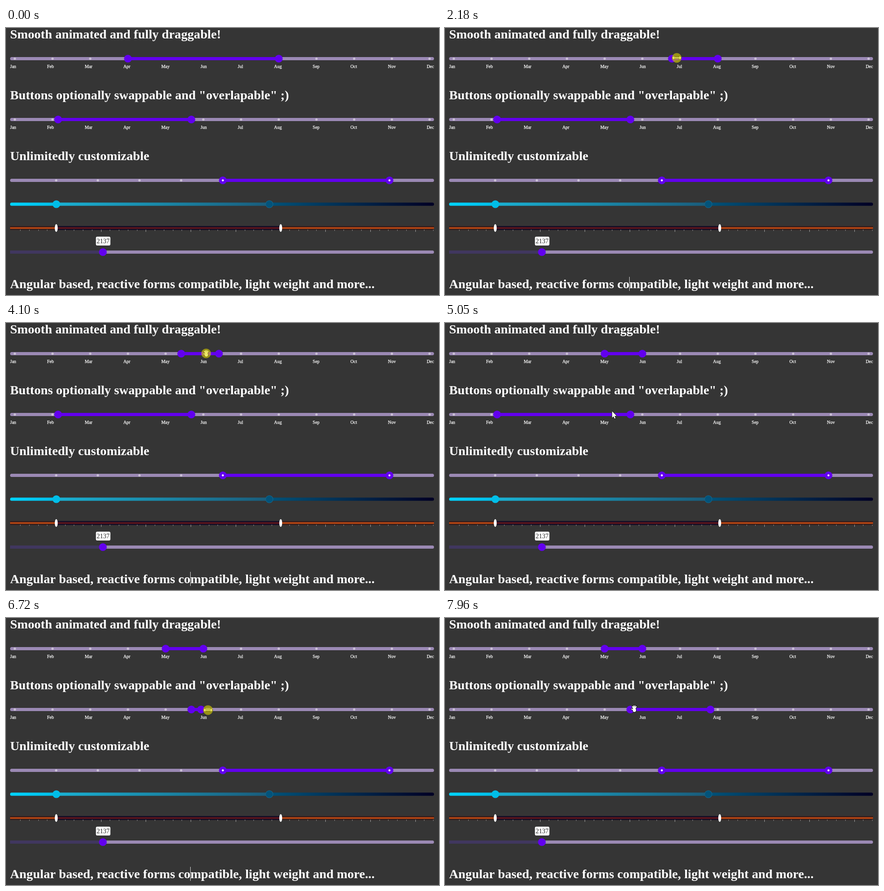
An HTML page with a canvas that plays this animation: 952 px wide and 588 px high, repeating every 8000 ms.

```html
<!DOCTYPE html>
<html lang="en">
<head>
<meta charset="utf-8">
<title>Range sliders</title>
<style>
  html, body { margin: 0; width: 100%; height: 100%; overflow: hidden; background: #353535; }
  canvas { display: block; }
</style>
</head>
<body>
<canvas id="stage" width="952" height="588"></canvas>
<script>
const ctx = document.getElementById('stage').getContext('2d');
const LOOP = 8000, LEFT = 9, RIGHT = 941, LAG = 40;
const SERIF = '"Liberation Serif", "Times New Roman", serif';
const BG = '#353535', TRACK = '#9b89b4', ACTIVE = '#6200ee', DOT = '#cbc1d6';
const MONTHS = 'Jan Feb Mar Apr May Jun Jul Aug Sep Oct Nov Dec'.split(' ');
const monthX = i => 19.4 + i * 82.9;

const linear = u => u;
const smooth = u => u * u * (3 - 2 * u);
const easeOut = u => 1 - (1 - u) ** 3;
const mix = (a, b, u) => a + (b - a) * u;
const clamp = u => Math.max(0, Math.min(1, u));

// Stops of the pointer; the last field eases the way there
const STOPS = [
  { t: 320, x: 72, y: 580 },
  { t: 1090, x: 259, y: 55 },
  { t: 1160, x: 267, y: 64 },
  { t: 1525, x: 267, y: 64 },
  { t: 2300, x: 526, y: 66 },
  { t: 3000, x: 577, y: 67 },
  { t: 3400, x: 577, y: 67 },
  { t: 4200, x: 434, y: 67 },
  { t: 4550, x: 473, y: 137 },
  { t: 5050, x: 367, y: 194 },
  { t: 5480, x: 131, y: 201 },
  { t: 5620, x: 118, y: 200 },
  { t: 7200, x: 586, y: 204, ease: linear },
  { t: 7960, x: 416, y: 200 }
];
const SHAPES = [[320, arrow], [1160, resize], [2340, hand], [4290, arrow], [5130, hand], [5600, resize], [7340, hand]];
const PRESSES = [[1490, 2300], [3400, 4230], [5620, 7250]];
const CARET = [[1500, 2340], [3160, 4250], [5080, 5700], [6360, 7300]];

const within = (spans, t) => spans.some(([a, b]) => t >= a && t < b);

function pointer(t) {
  const next = STOPS.findIndex(s => s.t > t);
  if (next < 1) return STOPS.at(next);
  const a = STOPS[next - 1], b = STOPS[next];
  const u = (b.ease || smooth)((t - a.t) / (b.t - a.t));
  return { x: mix(a.x, b.x, u), y: mix(a.y, b.y, u) };
}

// Handle pulled along with the pointer while pressed, then eased to its resting place
function dragged(t, [down, up], from, to) {
  const grab = pointer(down).x;
  const pull = from + pointer(Math.max(down, Math.min(t, up) - LAG)).x - grab;
  return mix(pull, to, easeOut(clamp((t - up) / 220)));
}

function monthRange(t) {
  if (t < PRESSES[1][0]) return [dragged(t, PRESSES[0], monthX(3), monthX(6)), monthX(7)];
  const a = dragged(t, PRESSES[1], monthX(6), monthX(4));
  return [a, a + monthX(1) - monthX(0)];
}

function box(x, y, w, h, fill, r = 0) {
  ctx.fillStyle = fill;
  ctx.beginPath();
  ctx.roundRect(x, y, w, h, r);
  ctx.fill();
}

function oval(x, y, rx, ry, fill) {
  ctx.fillStyle = fill;
  ctx.beginPath();
  ctx.ellipse(x, y, rx, ry, 0, 0, Math.PI * 2);
  ctx.fill();
}

const disc = (x, y, r, fill) => oval(x, y, r, r, fill);
const bar = (y, fill) => box(LEFT, y - 3.5, RIGHT - LEFT, 7, fill, 3.5);
const span = (a, b, y, fill) => box(Math.min(a, b), y - 3.5, Math.abs(b - a), 7, fill);
const handle = (x, y, fill = ACTIVE) => disc(x, y, 8.6, fill);

function text(s, x, y, font, fill = '#fff') {
  ctx.font = font + ' ' + SERIF;
  ctx.fillStyle = fill;
  ctx.fillText(s, x, y);
}

const heading = (s, y) => text(s, LEFT, y, 'bold 28.2px');

function monthLabels(y) {
  ctx.font = '10px ' + SERIF;
  ctx.strokeStyle = '#fff';
  ctx.lineWidth = 0.25;
  const widths = MONTHS.map(m => ctx.measureText(m).width);
  const gap = (RIGHT - LEFT - widths.reduce((s, w) => s + w)) / (MONTHS.length - 1);
  let x = LEFT;
  MONTHS.forEach((m, i) => {
    text(m, x, y, '10px');
    ctx.strokeText(m, x, y);
    x += widths[i] + gap;
  });
}

function monthSlider(y, a, b) {
  bar(y, TRACK);
  MONTHS.forEach((m, i) => disc(monthX(i), y, 2.6, DOT));
  span(a, b, y, ACTIVE);
  handle(a, y);
  handle(b, y);
  monthLabels(y + 20.5);
}

function dotSlider(y) {
  const dotX = i => 110.3 + i * 91.6;
  bar(y, TRACK);
  for (let i = 0; i < 4; i++) disc(dotX(i), y, 2.6, DOT);
  span(dotX(4), dotX(8), y, ACTIVE);
  for (const i of [4, 8]) {
    handle(dotX(i), y);
    disc(dotX(i), y, 2.2, '#fff');
  }
}

function blueSlider(y) {
  const g = ctx.createLinearGradient(LEFT, 0, RIGHT, 0);
  g.addColorStop(0, 'rgb(0,212,255)');
  g.addColorStop(1, 'rgb(0,0,36)');
  bar(y, g);
  span(110.5, 579, y, 'rgba(130,130,130,.2)');
  handle(110.7, y, 'rgb(0,190,232)');
  handle(579, y, 'rgb(22,104,140)');
  disc(579, y, 7.6, 'rgb(4,83,122)');
}

function glowBar(a, b, y, edge, core) {
  const g = ctx.createLinearGradient(0, y - 4.5, 0, y + 4.5);
  [edge, edge, core, edge, edge].forEach((c, i) => g.addColorStop(i / 4, c));
  box(a, y - 4.5, b - a, 9, g);
}

function fireSlider(y) {
  const a = 110.5, step = 19.74;
  glowBar(LEFT, RIGHT, y, '#38201e', '#f2560c');
  glowBar(a, a + 25 * step, y, '#170f26', '#7c1616');
  for (let i = -4; i <= 42; i++) {
    const major = i % 5 === 0;
    box(Math.floor(a + i * step), 444, 1, major ? 5 : 3, major ? '#a0a0a0' : '#858585');
  }
  for (const x of [a, a + 25 * step]) oval(x, y, 3.2, 8.4, '#fff');
}

function valueSlider(y) {
  bar(y, TRACK);
  span(LEFT, 213, y, '#40375f');
  handle(213, y);
  box(197.7, y - 34, 31.8, 19.5, '#fff', 3);
  text('2137', 199.3, y - 19.5, '14.2px', '#222');
}

function poly(points) {
  ctx.beginPath();
  points.forEach(([x, y]) => ctx.lineTo(x, y));
  ctx.closePath();
}

// Dark outline first, white body on top
function outlined(w, paint) {
  for (const [color, extra] of [['#111', 1.9], ['#fff', 0]]) {
    ctx.strokeStyle = ctx.fillStyle = color;
    ctx.lineWidth = w + extra;
    paint();
  }
}

function arrow() {
  outlined(0.2, () => {
    poly([[0.5, 0.5], [0.5, 14.5], [3.6, 11.7], [5.8, 16.6], [7.9, 15.7], [5.8, 10.8], [10.2, 10.6]]);
    ctx.fill();
    ctx.stroke();
  });
}

function resize() {
  outlined(0.2, () => {
    for (const s of [-1, 1]) {
      poly([[0, -1], [6 * s, -1], [6 * s, -4], [10 * s, 0], [6 * s, 4], [6 * s, 1], [0, 1]]);
      ctx.fill();
      ctx.stroke();
    }
  });
}

function hand() {
  const finger = (deg, len) => {
    const a = deg * Math.PI / 180;
    ctx.beginPath();
    ctx.moveTo(0.3, 2);
    ctx.lineTo(0.3 + len * Math.cos(a), 2 + len * Math.sin(a));
    ctx.stroke();
  };
  outlined(2.1, () => {
    for (let i = 0; i < 4; i++) finger(-122 + 21 * i, 9 - 0.6 * Math.abs(i - 1.5));
    finger(-168, 6);
    const grow = ctx.lineWidth / 2 - 1;
    oval(0.4, 2.9, 3.6 + grow, 4 + grow, ctx.fillStyle);
  });
}

function drawPointer(t) {
  const shape = SHAPES.filter(s => s[0] <= t).pop();
  if (!shape) return;
  const { x, y } = pointer(t);
  ctx.save();
  ctx.translate(x, y);
  ctx.lineCap = ctx.lineJoin = 'round';
  shape[1]();
  ctx.restore();
  if (within(PRESSES, t)) disc(x, y, 10.6, 'rgba(225,215,0,.58)');
}

function draw(t) {
  box(0, 0, 952, 588, BG);
  heading('Smooth animated and fully draggable!', 23);
  monthSlider(67.5, ...monthRange(t));
  heading('Buttons optionally swappable and "overlapable" ;)', 157);
  monthSlider(201.5, dragged(t, PRESSES[2], 114.5, 583.5), 407.5);
  heading('Unlimitedly customizable', 291);
  dotSlider(335.5);
  blueSlider(388);
  fireSlider(440.5);
  valueSlider(493.5);
  heading('Angular based, reactive forms compatible, light weight and more...', 573);
  if (within(CARET, t)) box(405, 548, 1, 31, '#d8d8d8');
  drawPointer(t);
}

const start = performance.now();
function frame() {
  draw((performance.now() - start) % LOOP);
  requestAnimationFrame(frame);
}
frame();
</script>
</body>
</html>
```
